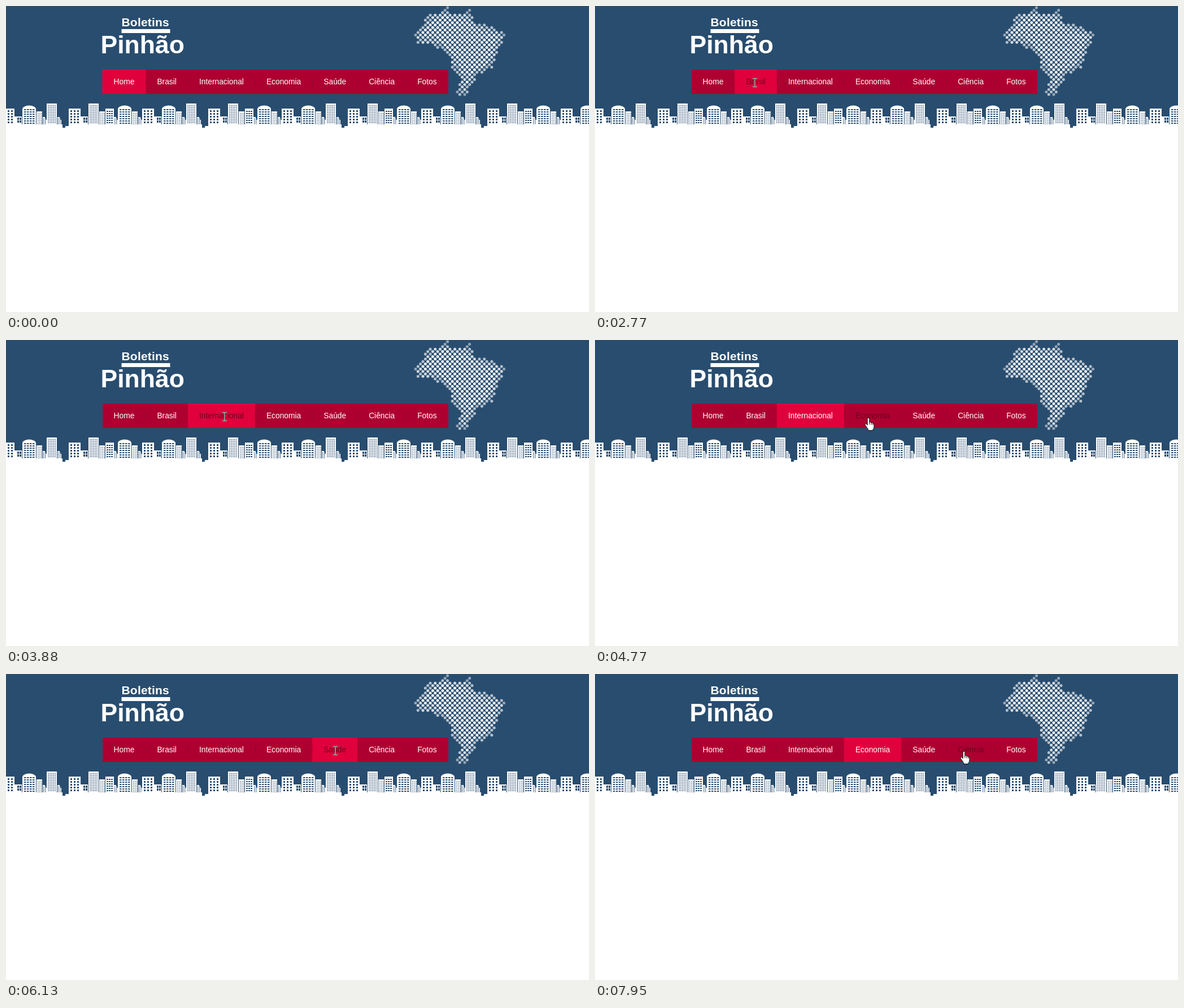
Write an HTML page with a canvas that moves like this. It is 1032 px wide and 543 px high and loops after 8 s.

```html
<!DOCTYPE html>
<html lang="pt">
<head>
<meta charset="utf-8">
<style>
  html, body { margin: 0; width: 100%; height: 100%; overflow: hidden; background: #fff; }
  canvas, svg { position: absolute; left: 0; top: 0; }
  text { font-family: "Liberation Sans", Arial, sans-serif; fill: #fff; }
  .logo { font-weight: bold; }
</style>
</head>
<body>
<canvas id="scene" width="1032" height="543"></canvas>
<svg width="1032" height="543">
  <defs>
    <linearGradient id="fade" x2="0" y2="1">
      <stop offset="0" stop-color="#6c1030" stop-opacity="0"/>
      <stop offset=".5" stop-color="#6c1030"/>
      <stop offset="1" stop-color="#6c1030" stop-opacity="0"/>
    </linearGradient>
  </defs>
  <text class="logo" x="204.5" y="36" font-size="21" letter-spacing=".2">Boletins</text>
  <rect x="204.5" y="41" width="86" height="7" fill="#fff"/>
  <text class="logo" x="167.5" y="84" font-size="44.5">Pinhão</text>
  <rect x="171.5" y="113.5" width="611" height="42" fill="#ae0030" stroke="#9e0834"/>
  <g id="lines"></g>
  <rect id="active" y="113" height="43" fill="#e0003c"/>
  <g id="menu" font-size="13.8"></g>
  <circle id="ring" r="11.5" fill="#ff0" opacity=".4"/>
  <path id="arrow" fill="#fff" stroke="#000" d="M.5.5v16l3.7-3.5 2.4 5.5 2.6-1.1-2.4-5.4h5z"/>
  <g id="hand" fill="#fff" stroke="#111" stroke-linejoin="round">
    <path d="M-1.8 1.5Q0-1.5 1.8 1.5V8Q4 6.5 5 9q2-1 3 1 2-.5 2 2v4q0 3-2 4.5v2H-.5v-2L-5 14q-2-3 .3-3.5 1.4 0 2.9 2.5z"/>
    <path d="M1.8 8v4M5 9v3.5M8 10v3" fill="none"/>
  </g>
  <path id="beam" fill="none" stroke="#84b9aa" stroke-width="1.5"
    d="M-4-7.5h3l1 1 1-1h3M0-6.5v13M-4 7.5h3l1-1 1 1h3"/>
</svg>
<script>
const BLUE = '#294d6f', PALE = '#8297ad', LOOP = 8000, STEP = 70;
const $ = id => document.getElementById(id);
const ctx = $('scene').getContext('2d');

function box(x, y, w, h, color = '#fff') {
  ctx.fillStyle = color;
  ctx.fillRect(x, y, w, h);
}

const building = (x, top, w) => box(x, top, w, 216 - top);

// Windows repeat every (dx, dy) down to the foot of the building
function windows(x, y, cols, dx, dy, w, h, color = BLUE) {
  for (let c = 0; c < cols; c++)
    for (let top = y; top + h < 211; top += dy) box(x + c * dx, top, w, h, color);
}

// Each part of the skyline draws itself at x and returns the width it takes up
function house(x) {
  building(x, 182, 21);
  windows(x + 3, 185, 3, 6, 5, 3, 3);
  building(x + 21, 196, 13);
  windows(x + 26, 198, 2, 4, 5, 3, 4);
  return 35;
}

function tower(x) {
  building(x, 173, 18);
  windows(x + 2, 176, 5, 3, 3, 2, 2, PALE);
  return 19;
}

function annex(x) {
  building(x, 187, 10);
  windows(x + 2, 190, 3, 3, 3, 1.5, 2, PALE);
  return 11;
}

function office(x) {
  building(x, 182, 15);
  windows(x + 2, 186, 3, 4, 4, 3, 2);
  return 15;
}

function shed(x) {
  building(x, 197, 4);
  building(x + 4, 202, 3);
  windows(x + 1, 199, 2, 3, 11, 1.5, 11, PALE);
  return 7;
}

function dome(x) {
  building(x, 183, 24);
  ctx.beginPath();
  ctx.ellipse(x + 12, 183, 12, 6.5, 0, Math.PI, 0);
  ctx.fill();
  windows(x + 3, 183, 4, 5, 4, 3.5, 2);
  return 25;
}

const street = [house, tower, annex, office, shed, dome, annex, shed,
  house, dome, annex, shed, tower, shed];

function cityBlock(x) {
  box(x, 213, 6, 3);
  box(x + 6, 210, 236, 6);
  street.reduce((left, part) => left + part(left), x + 6);
}

function dottedMap() {
  const outline = new Path2D('M781 0L788 14 805 14 823 5 829 28 858 37 887 48 873 76 862 108 '
    + '836 121 811 163 795 152 808 127 790 112 787 90 766 76 757 66 727 67 723 49 741 32 744 15 767 12z');
  const inside = (x, y) => ctx.isPointInPath(outline, x, y);
  ctx.fillStyle = '#fff';
  for (let row = 0; row < 38; row++)
    for (let x = 720.6 + row % 2 * 4.35; x < 890; x += 8.7) {
      const y = 3 + row * 4.4;
      if (!inside(x, y)) continue;
      const near = inside(x - 11, y) + inside(x + 11, y) + inside(x, y - 11) + inside(x, y + 11);
      ctx.globalAlpha = .35 + near * .15;
      ctx.beginPath();
      ctx.arc(x, y, 2.5, 0, 7);
      ctx.fill();
    }
  ctx.globalAlpha = 1;
}

function add(parent, tag, attrs) {
  const el = document.createElementNS('http://www.w3.org/2000/svg', tag);
  for (const key in attrs) el.setAttribute(key, attrs[key]);
  return parent.appendChild(el);
}

box(0, 0, 1032, 216, BLUE);
dottedMap();
for (let x = -142; x < 1032; x += 247) cityBlock(x);

// Every menu entry is its text plus 20 px on both sides
ctx.font = '13.8px "Liberation Sans", Arial, sans-serif';
let edge = 170.6;
const items = ['Home', 'Brasil', 'Internacional', 'Economia', 'Saúde', 'Ciência', 'Fotos'].map((name, i) => {
  const left = edge;
  edge += ctx.measureText(name).width + 40;
  if (i) add($('lines'), 'rect', { x: Math.round(left), y: 126, width: 1, height: 16, fill: 'url(#fade)' });
  const label = add($('menu'), 'text', { x: left + 20, y: 138.5 });
  label.textContent = name;
  return { left, right: edge, label };
});

// Pointer moves: start, end, and the place reached
const moves = [
  [0, 0, 420, 494],
  [520, 1290, 221, 137],
  [1690, 1830, 264, 135],
  [1960, 2030, 283, 136],
  [2770, 3120, 308, 229],
  [3190, 3540, 387, 136],
  [4010, 4220, 394, 225],
  [4350, 4770, 484, 138],
  [4890, 5170, 468, 178],
  [5250, 5320, 480, 178],
  [5390, 5740, 583, 136],
  [6390, 6670, 540, 177],
  [6670, 6880, 488, 137],
  [7210, 7420, 560, 174],
  [7420, 7690, 653, 137]];

// Clicks: time and chosen entry; the new page appears after LOAD ms
const LOAD = 140, RING = 80;
const clicks = [[-LOAD, 0], [1550, 0], [2560, 1], [3670, 2], [5920, 4], [7000, 3], [7860, 5]];

const lastBefore = (list, t) => list.filter(([time]) => time <= t).pop();

function pointerAt(t) {
  const move = lastBefore(moves, t), [start, end, x, y] = move;
  const [, , x0, y0] = moves[Math.max(0, moves.indexOf(move) - 1)];
  const u = end > start ? Math.min(1, Math.floor((t - start) / STEP) * STEP / (end - start)) : 1;
  const eased = u * u * (3 - 2 * u);
  return [x0 + (x - x0) * eased, y0 + (y - y0) * eased];
}

function show(id, visible, x, y) {
  $(id).style.display = visible ? '' : 'none';
  $(id).setAttribute('transform', `translate(${x} ${y})`);
}

function draw() {
  const t = performance.now() % LOOP;
  const [x, y] = pointerAt(t);
  const [clicked] = lastBefore(clicks, t);
  const [opened, page] = lastBefore(clicks, t - LOAD);
  const { left, right } = items[page];
  $('active').setAttribute('x', left);
  $('active').setAttribute('width', right - left);

  const visible = t >= 520 + STEP;
  const overText = item => y > 126 && y < 148 && x > item.left + 18 && x < item.right - 18;
  const hovered = visible && items.find(overText);
  for (const item of items) item.label.style.fill = item === hovered ? '#6c0020' : '#fff';

  // A freshly opened page shows the text cursor until the pointer moves on
  const beam = hovered && opened > 0 && lastBefore(moves, t - STEP)[0] < opened;
  show('beam', beam, x, y);
  show('hand', hovered && !beam, x, y);
  show('arrow', visible && !hovered, x, y);
  show('ring', clicked > 0 && t - clicked < RING, x, y);
  requestAnimationFrame(draw);
}
draw();
</script>
</body>
</html>
```
